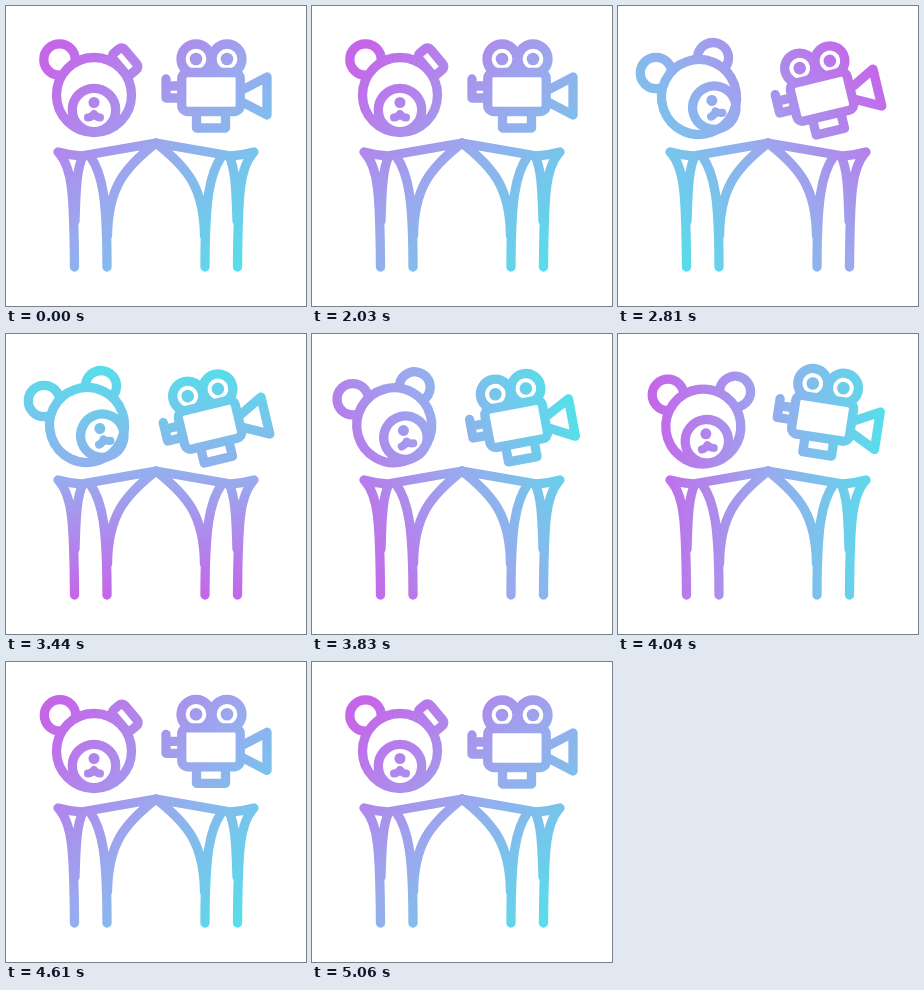
Write an HTML page with a canvas that moves like this. It is 300 px wide and 300 px high and loops after 5.09 s.

```html
<!DOCTYPE html>
<html>
<head>
<meta charset="utf-8">
<style>
  html, body { margin: 0; width: 100%; height: 100%; overflow: hidden; background: #fff; }
  canvas { display: block; }
</style>
</head>
<body>
<canvas id="stage" width="300" height="300"></canvas>
<script>
const LOOP = 5090, START = 2030, END = 5060;
const ctx = document.getElementById('stage').getContext('2d');

const clamp = x => Math.min(1, Math.max(0, x));
const mix = (a, b, u) => a + (b - a) * u;
const smooth = u => u * u * (3 - 2 * u);
const ramp = (t, from, to) => smooth(clamp((t - from) / (to - from)));
const bump = (t, peak, reach) => Math.cos(clamp(Math.abs(t - peak) / reach) * Math.PI / 2) ** 2;

function circle(x, y, r) {
  const p = new Path2D();
  p.arc(x, y, r, 0, 7);
  return p;
}

function box(w, h, r) {
  const p = new Path2D();
  p.roundRect(-w / 2, -h / 2, w, h, r);
  return p;
}

const line = (p, width = 9.3) => { ctx.lineWidth = width; ctx.stroke(p); };
const dot = (x, y, r) => ctx.fill(circle(x, y, r));

// Outline that hides whatever lies behind it.
function solid(p) {
  ctx.globalCompositeOperation = 'destination-out';
  ctx.fill(p);
  ctx.globalCompositeOperation = 'source-over';
  line(p);
}

function placed(x, y, degrees, draw) {
  ctx.save();
  ctx.translate(x, y);
  ctx.rotate(degrees * Math.PI / 180);
  draw();
  ctx.restore();
}

const MOUTH = new Path2D('M-6 22.5Q-2 22 0 19Q2 22 6 22.5');
const TAB = new Path2D('M-45 -13V6M-45 -6H-33M-45 6H-33');
const LENS = new Path2D('M33 -3L56 -15V23L33 11');
const FOOT = new Path2D('M-14.5 23V36H14.5V23');
const STAND = new Path2D('M52 146Q63 149 75 150L150 137' +
  'M53 147C66 162 68 185 68.5 261M77 150C71 162 70 180 69 215' +
  'M84 150C97 168 101 195 101 261M150 137C118 162 102 182 101.5 230');

function drawBear(lean, dip, hop, eyesOpen) {
  const far = lean * lean;
  const fold = clamp(1.1 - 4 * lean);
  line(circle(mix(53.5, 38, lean) + 7 * hop, mix(53.5, 67, lean) + dip - 2 * hop, 15.7));
  placed(mix(119, 95, far) + 5 * hop, mix(55.5, 52, lean) + dip + 2 * hop, 50,
    () => line(box(mix(31, 27, fold), mix(31, 15, fold), mix(15.5, 4, fold))));
  placed(mix(88, 81, lean), mix(89, 91, lean) + dip, -19 * lean, () => {
    const shift = 11 * far;
    solid(circle(0, 0, 37.5));
    line(circle(shift, 15, 21.7));
    if (eyesOpen) for (const side of [-17.5, 17.5]) dot(side + shift * .75, -10.5, 5);
    ctx.translate(shift, 0);
    dot(0, 7.5, 5.5);
    line(MOUTH, 8);
  });
}

function drawCamera(lean, hop, swing, lampOn) {
  placed(205 - lean, 86 + 4.7 * lean - 10 * hop, 14 * swing - 13.5 * lean, () => {
    for (const reel of [-15, 16]) {
      line(circle(reel, -33, 15));
      dot(reel, -33, 6.3);
    }
    [TAB, LENS, FOOT].forEach(p => line(p));
    solid(box(58.5, 39, 6));
    if (lampOn) dot(-16, 9.5, 4.7);
  });
}

function drawStand() {
  line(STAND);
  ctx.save();
  ctx.translate(300, 0);
  ctx.scale(-1, 1);
  line(STAND);
  ctx.restore();
}

// Tints everything drawn so far with one gradient fixed to the stage.
function tint(degrees) {
  const a = degrees * Math.PI / 180;
  const r = 115 * (1 + .22 * Math.sin(2 * a) ** 2);
  const dx = r * Math.cos(a), dy = r * Math.sin(a);
  const g = ctx.createLinearGradient(148 - dx, 148 - dy, 148 + dx, 148 + dy);
  ['#c566e9', '#9aa9ee', '#57deea'].forEach((color, i) => g.addColorStop(i / 2, color));
  ctx.globalCompositeOperation = 'source-in';
  ctx.fillStyle = g;
  ctx.fillRect(0, 0, 300, 300);
  ctx.globalCompositeOperation = 'source-over';
}

function frame() {
  const t = performance.now() % LOOP;
  const lean = ramp(t, START, 2560) - ramp(t, 3650, 4330);
  const dip = 7 * bump(t, 2400, 300) + 3 * bump(t, 4000, 240);
  const hop = bump(t, 4280, 400);
  const swing = bump(t, 4040, 240);
  const blink = bump(t, 2420, 140) > 0;
  const turn = smooth(1 - (1 - clamp((t - START) / (END - START))) ** 1.4);

  ctx.clearRect(0, 0, 300, 300);
  drawBear(lean, dip, hop, !blink);
  drawCamera(lean, hop, swing, !blink && swing < .4);
  drawStand();
  tint(45 + 360 * turn);
  requestAnimationFrame(frame);
}

ctx.lineCap = ctx.lineJoin = 'round';
frame();
</script>
</body>
</html>
```
